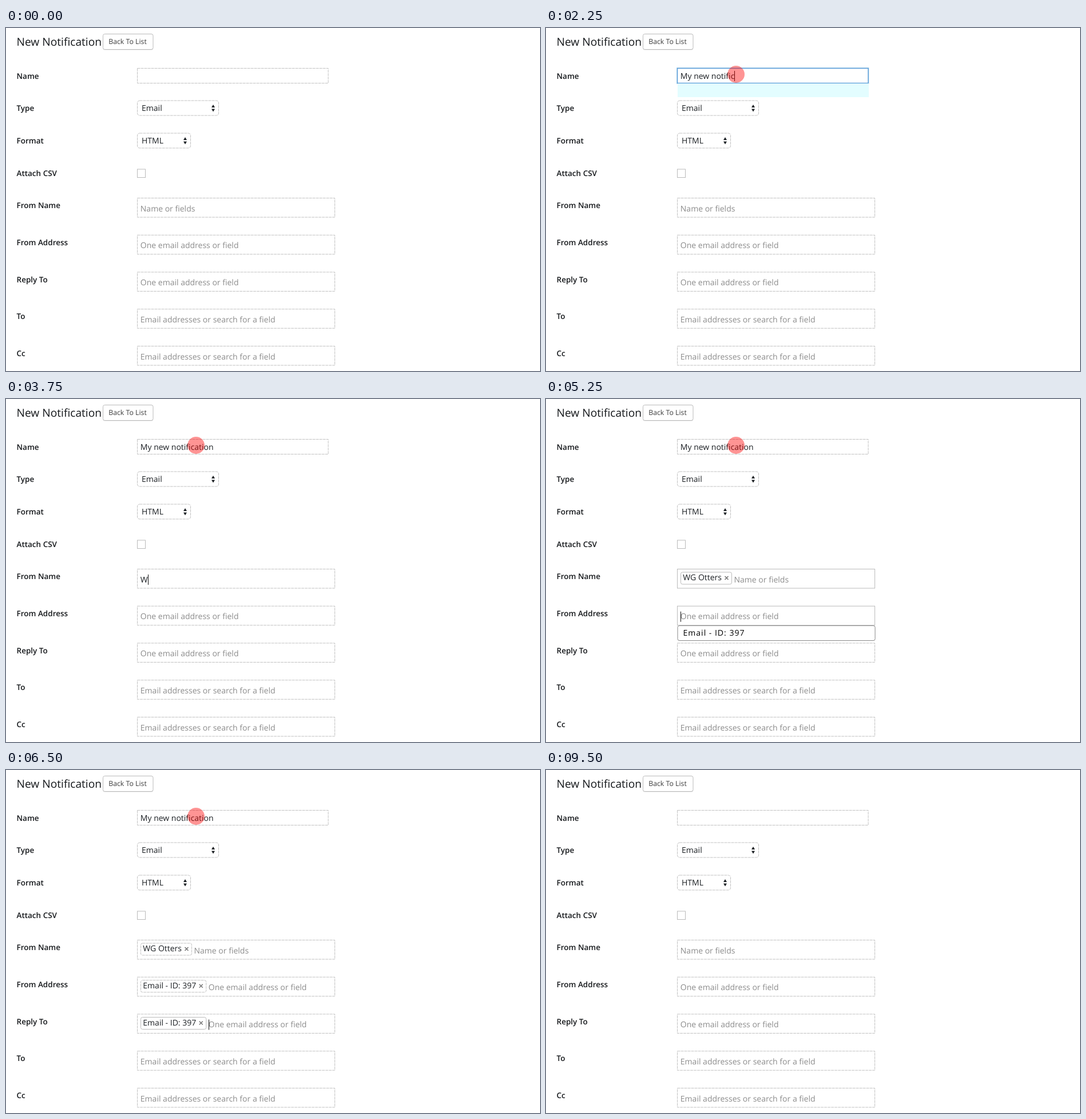
An HTML page that plays this animation: 933 px wide and 600 px high, repeating every 10 s.

```html
<!DOCTYPE html>
<html lang="en">
<head>
<meta charset="utf-8">
<title>New Notification</title>
<style>
  html, body { margin: 0; width: 100%; height: 100%; overflow: hidden; background: #fff; }
  svg { display: block; font: 14px "Open Sans", sans-serif; fill: #1c2024; text-rendering: geometricPrecision; }
  text { white-space: pre; }
  .title { font-size: 19.2px; fill: #15181b; }
  .button { font-size: 12.3px; fill: #3c3c3c; }
  .label { font-size: 13.5px; font-weight: 600; fill: #15181b; }
  .hint { fill: #8c8c8c; }
  .option { letter-spacing: 1px; fill: #000; }
  .line { fill: #fff; stroke: #bbb; }
  .dash { stroke: #c2c2c2; stroke-dasharray: 5 1; }
  .focus { stroke: #5b9dd9; stroke-width: 1.5; }
  .glow { fill: none; stroke: #1e8cbe; stroke-opacity: .25; stroke-width: 3; }
  .menu { fill: #fff; stroke: #888; }
  .cross { stroke: #777; stroke-width: 1.6; }
  .caret { stroke: #111; }
</style>
</head>
<body>
<svg id="stage" width="933" height="600" viewBox="0 0 933 600"></svg>
<script>
const LOOP = 10000, RESET = 9500;
const SENDER = 'WG Otters', EMAIL = 'Email - ID: 397', ADDRESS = 'we@wgotters.com';
const TITLE = 'My new notification';
const TEXT_X = 234.8, CHIP_TEXT_X = 239.3;
const ONE = 'One email address or field', MANY = 'Email addresses or search for a field';
const hints = { from: 'Name or fields', address: ONE, reply: ONE, to: MANY, cc: MANY };

const stage = document.getElementById('stage');
const pen = document.createElement('canvas').getContext('2d');
pen.font = '14px "Open Sans", sans-serif';
pen.textRendering = 'geometricPrecision';
const widthOf = s => pen.measureText(s).width;

const text = (x, y, s, cls = '') => `<text x="${x}" y="${y}" class="${cls}">${s}</text>`;
const box = (x, y, w, h, cls = 'line dash', r = 0) =>
  `<rect x="${x}" y="${y}" width="${w}" height="${h}" rx="${r}" class="${cls}"/>`;
const caret = (x, y) => `<path class="caret" d="M${Math.floor(x) + .5} ${y}v18"/>`;

function select(y, width, value) {
  const x = 229.5 + width - 9.5;
  return box(229.5, y, width, 26, 'line dash', 4) + text(237, y + 18, value) +
    `<path d="M${x - 3} ${y + 12}h6l-3-5zM${x - 3} ${y + 14.5}h6l-3 5z"/>`;
}

function chip(y, value, fresh) {
  const end = CHIP_TEXT_X + widthOf(value);
  return box(235.5, y + 5.5, end + 17.5 - 235.5, 21, fresh ? 'line' : 'line dash', 3) +
    text(CHIP_TEXT_X, y + 19.8, value) +
    `<path class="cross" d="M${end + 5.5} ${y + 12.5}l6 6m0-6l-6 6"/>`;
}

function tokenField(key, i, state) {
  const y = 297.5 + 64.75 * i;
  const token = state.chips[key], typed = state.typed[key] || '';
  const active = state.active === key;
  const x = token ? CHIP_TEXT_X + widthOf(token) + 21.5 : TEXT_X;
  let out = box(229.5, y, 345, 33.5, state.freshBoxes.includes(key) ? 'line' : 'line dash');
  if (token) out += chip(y, token, state.freshChip === key);
  out += typed ? text(x, y + 23.2, typed) : text(x, y + 23.2, hints[key], 'hint');
  if (active) out += caret(x + widthOf(typed) + .5, y + 9.5);
  return out;
}

function menu(i) {
  const y = 297.5 + 64.75 * i + 34.3;
  return box(230, y, 345, 26, 'menu', 3) + text(239.5, y + 17.5, EMAIL, 'option');
}

// Each step changes part of the form; typed and chips are merged by field.
const steps = [
  [1500, { active: 'name' }],
  [1750, { typed: { name: TITLE.slice(0, 1) } }],
  [2000, { typed: { name: TITLE.slice(0, 7) } }],
  [2250, { typed: { name: TITLE.slice(0, 14) }, flash: true }],
  [2500, { typed: { name: TITLE }, flash: false }],
  [3250, { active: 'from' }],
  [3750, { typed: { from: SENDER.slice(0, 1) } }],
  [4000, { typed: { from: SENDER.slice(0, 5) } }],
  [4250, { typed: { from: SENDER } }],
  [4500, { typed: { from: '' }, chips: { from: SENDER }, freshChip: 'from', freshBoxes: ['from'] }],
  [5000, { active: 'address', menu: 1, freshBoxes: ['from', 'address'] }],
  [5500, { chips: { address: EMAIL }, menu: 0, freshChip: 'address', freshBoxes: [] }],
  [6000, { active: 'reply', menu: 2 }],
  [6250, { chips: { reply: EMAIL }, menu: 0, freshChip: 'reply' }],
  [7000, { active: 'to', menu: 3, freshChip: '' }],
  [7250, { typed: { to: ADDRESS.slice(0, 2) }, menu: 0 }],
  [7750, { typed: { to: ADDRESS.slice(0, 5) } }],
  [8000, { typed: { to: ADDRESS.slice(0, 9) } }],
  [8500, { typed: { to: ADDRESS } }],
  [9000, { typed: { to: '' }, chips: { to: ADDRESS }, freshChip: 'to' }]
];

function stateAt(time) {
  const state = { active: '', typed: {}, chips: {}, menu: 0, flash: false, freshChip: '', freshBoxes: [] };
  if (time >= RESET) return state;
  for (const [start, change] of steps) {
    if (start > time) break;
    const typed = { ...state.typed, ...change.typed };
    const chips = { ...state.chips, ...change.chips };
    Object.assign(state, change, { typed, chips });
  }
  return state;
}

function nameField(state) {
  const focused = state.active === 'name', typed = state.typed.name || '';
  let out = focused ? box(229.5, 70.5, 333.5, 26, 'glow') : '';
  out += box(229.5, 70.5, 333.5, 26, focused ? 'line focus' : 'line dash');
  out += text(TEXT_X, 88.5, typed);
  if (focused) out += caret(TEXT_X + widthOf(typed) + .5, 75);
  if (state.flash) out += '<rect x="230" y="97" width="334" height="24" fill="#e3fdff"/>';
  return out;
}

function pointer(time) {
  if (time < 500 || time >= RESET) return '';
  const p = Math.min(1, (time - 500) / 750);
  const left = 1 - p * p * (3 - 2 * p);
  return `<circle cx="${332 + 314 * left}" cy="${81 + 230 * left}" r="15" fill="red" fill-opacity=".42"/>`;
}

const labels = [['Name', 88.5], ['Type', 144.8], ['Format', 201.8], ['Attach CSV', 258.8],
  ['From Name', 315], ['From Address', 379.8], ['Reply To', 444.5], ['To', 509.3], ['Cc', 574]];

const fixedParts = text(18.5, 31, 'New Notification', 'title') +
  '<rect x="169.5" y="11.5" width="87.5" height="27" rx="3" fill="#ddd"/>' +
  box(169.5, 10.5, 87.5, 27, 'line', 3) + text(179.2, 28.3, 'Back To List', 'button') +
  labels.map(([s, y]) => text(18.5, y, s, 'label')).join('') +
  select(127, 142, 'Email') + select(184, 93, 'HTML') +
  box(229.5, 247, 14, 14.5, 'line');

let shown = -1;
function draw(now) {
  const time = Math.floor(now % LOOP / 250) * 250;
  if (time !== shown) {
    shown = time;
    const state = stateAt(time);
    stage.innerHTML = fixedParts + nameField(state) +
      Object.keys(hints).map((key, i) => tokenField(key, i, state)).join('') +
      (state.menu ? menu(state.menu) : '') + pointer(time);
  }
  requestAnimationFrame(draw);
}
draw(performance.now());
</script>
</body>
</html>
```
